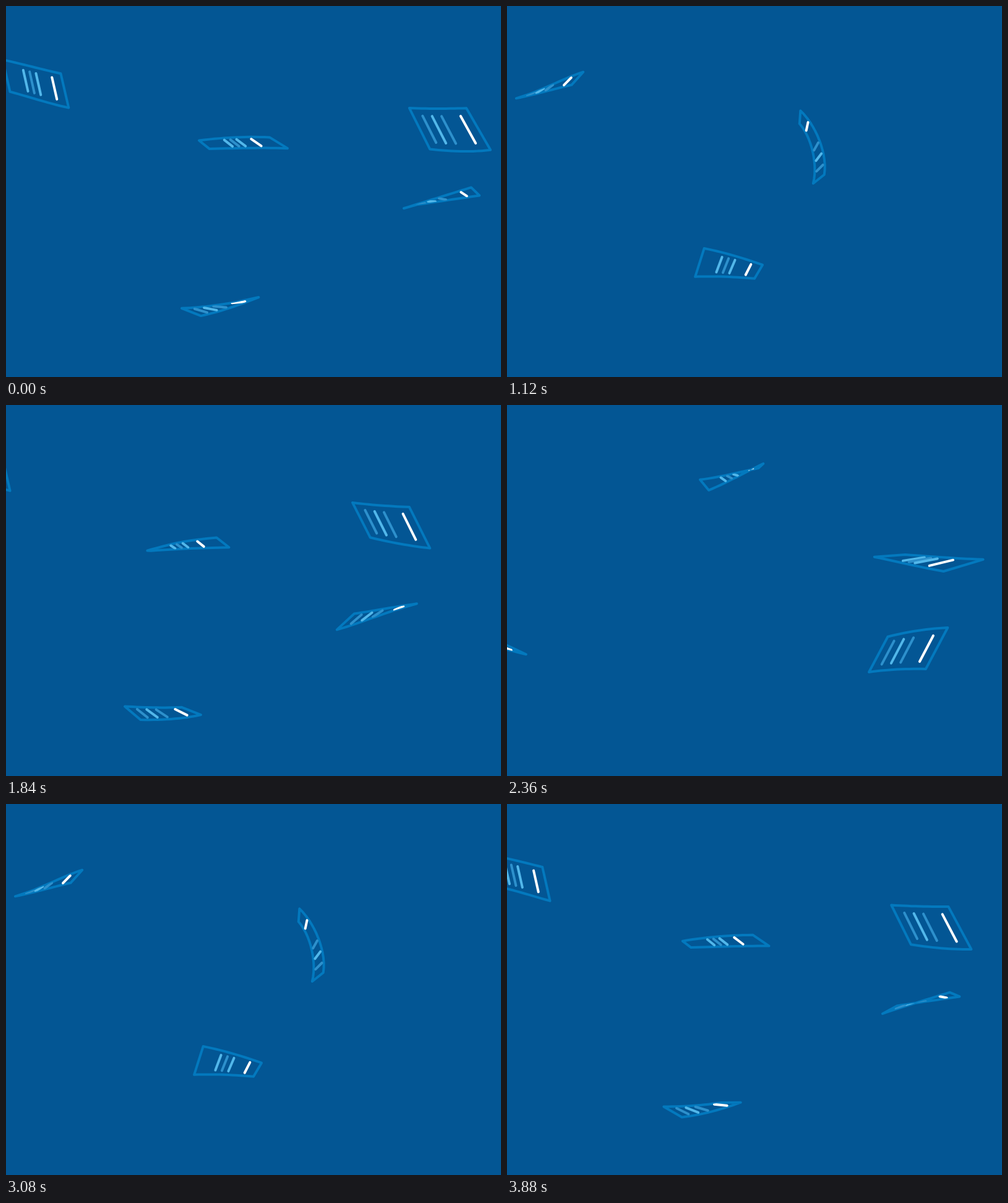
Animation, 800 px wide and 600 px high, one loop 3920 ms. Source, as an HTML page with a canvas:

```html
<!DOCTYPE html>
<html lang="en">
<head>
<meta charset="utf-8">
<title>Flying cards</title>
<style>
  html, body { margin: 0; width: 100%; height: 100%; overflow: hidden; background: #035694; }
  canvas { display: block; }
</style>
</head>
<body>
<canvas id="stage" width="800" height="600"></canvas>
<script>
const ctx = document.getElementById('stage').getContext('2d');
const LOOP = 1960, STEP = 40, SAMPLES = 14, DETAIL = 24;
const BG = '#035694', EDGE = '#0379be', DIM = '#2d90cc', SKY = '#52b7ea', WHITE = '#fff';

const WIDE = { span: 120, at: [.165, .33, .495, .825], ink: [DIM, SKY, DIM, WHITE] };
const TIGHT = { span: 120, at: [.33, .44, .55, .825], ink: [SKY, DIM, SKY, WHITE] };
const LONG = { span: 160, at: [.325, .41, .495, .7], ink: [SKY, DIM, SKY, WHITE] };

const mix = (p, q, v) => [p[0] + (q[0] - p[0]) * v, p[1] + (q[1] - p[1]) * v];
const dist = (p, q) => Math.hypot(q[0] - p[0], q[1] - p[1]);

// Smooth curve through the key points, as a fine polyline.
function smooth(keys) {
  const last = keys.length - 1;
  const gap = keys.slice(1).map((q, i) => dist(keys[i], q));
  const slope = (i, k) => (keys[i + 1][k] - keys[i][k]) / gap[i];
  const tangent = (i, k) => {
    if (i === 0) return slope(0, k);
    if (i === last) return slope(last - 1, k);
    return (slope(i - 1, k) * gap[i] + slope(i, k) * gap[i - 1]) / (gap[i - 1] + gap[i]);
  };
  const line = [keys[0]];
  for (let i = 0; i < last; i++) {
    for (let n = 1; n <= DETAIL; n++) {
      const s = n / DETAIL, ease = s * s * (3 - 2 * s);
      line.push([0, 1].map(k =>
        keys[i][k] + (keys[i + 1][k] - keys[i][k]) * ease +
        gap[i] * s * (1 - s) * (tangent(i, k) * (1 - s) - tangent(i + 1, k) * s)));
    }
  }
  return line;
}

// Travel along the keys at constant speed, passing x at the given time.
// Both ends run on straight.
function rail(speed, x, time, keys) {
  const line = smooth(keys), length = [0];
  for (let i = 1; i < line.length; i++) length[i] = length[i - 1] + dist(line[i - 1], line[i]);
  const locate = test => {
    let i = 1;
    while (i < line.length - 1 && test(i)) i++;
    return i;
  };
  const j = locate(i => line[i][0] < x);
  const part = (x - line[j - 1][0]) / (line[j][0] - line[j - 1][0]);
  const origin = length[j - 1] + part * (length[j] - length[j - 1]);
  return t => {
    const s = origin + speed * (t - time);
    const i = locate(n => length[n] < s);
    return mix(line[i - 1], line[i], (s - length[i - 1]) / (length[i] - length[i - 1]));
  };
}

// Heights at even steps across the stage.
const across = (...heights) => heights.map((y, i) => [150 * (i - 1), y]);

// Each card is stretched between two rails that cross and twist it.
const cards = [
  [TIGHT,
    rail(.803, 312, 280, across(52, 88, 120, 122, 94, 79, 84, 105)),
    rail(.819, 326, 280, across(95, 137, 171, 147, 80, 42, 39, 55))],
  [LONG,
    rail(.714, 426, 0, across(275, 276, 256, 219, 214, 247, 275, 274)),
    rail(.788, 455, 0, across(222, 236, 240, 232, 230, 239, 249, 253))],
  [WIDE,
    rail(.768, 744, 0, across(168, 152, 119, 113, 141, 162, 165, 150)),
    rail(.817, 783, 0, across(150, 152, 100, 99, 166, 217, 235, 213))],
  [WIDE,
    rail(.767, 284, -120, across(454, 470, 485, 488, 464, 430, 431, 456)),
    rail(.818, 315, -120, across(470, 495, 507, 504, 454, 379, 360, 394))],
  [TIGHT,
    rail(.818, 413, 1120, across(500, 435, 389, 389, 432, 500, 524, 517)),
    rail(.8, 400, 1120, across(540, 500, 460, 438, 446, 474, 490, 485))],
  // The looping flight.
  [WIDE,
    rail(.95, 148, 560, smooth([
      [34, 390], [148, 399], [390, 381], [482, 334], [513, 271], [475, 170], [400, 135],
      [292, 245], [400, 385], [521, 367], [628, 332], [737, 298]])),
    rail(.853, 166, 560, smooth([
      [-37, 386], [64, 410], [166, 420], [375, 387], [460, 341], [494, 290], [475, 193], [408, 154],
      [318, 245], [415, 352], [545, 340], [646, 324], [748, 309]]))]
];

function drawCard([style, a, b], t) {
  const at = u => t - style.span * (1 - u);
  const shape = new Path2D();
  for (let i = 0; i <= SAMPLES; i++) shape.lineTo(...a(at(i / SAMPLES)));
  for (let i = SAMPLES; i >= 0; i--) shape.lineTo(...b(at(i / SAMPLES)));
  shape.closePath();
  ctx.strokeStyle = EDGE;
  ctx.stroke(shape);

  ctx.save();
  ctx.clip(shape);
  style.at.forEach((u, i) => {
    const p = a(at(u)), q = b(at(u));
    ctx.strokeStyle = style.ink[i];
    ctx.beginPath();
    ctx.moveTo(...mix(p, q, .18));
    ctx.lineTo(...mix(p, q, .82));
    ctx.stroke();
  });
  ctx.restore();
}

function draw(t) {
  ctx.fillStyle = BG;
  ctx.fillRect(0, 0, 800, 600);
  ctx.lineWidth = 4;
  ctx.lineCap = ctx.lineJoin = 'round';
  for (const card of cards) {
    for (const lap of [-LOOP, 0, LOOP]) drawCard(card, t + lap);
  }
}

const begin = performance.now();
function tick() {
  const t = Math.max(0, performance.now() - begin);
  draw(Math.floor(t / STEP) * STEP % LOOP);
  requestAnimationFrame(tick);
}
tick();
</script>
</body>
</html>
```
